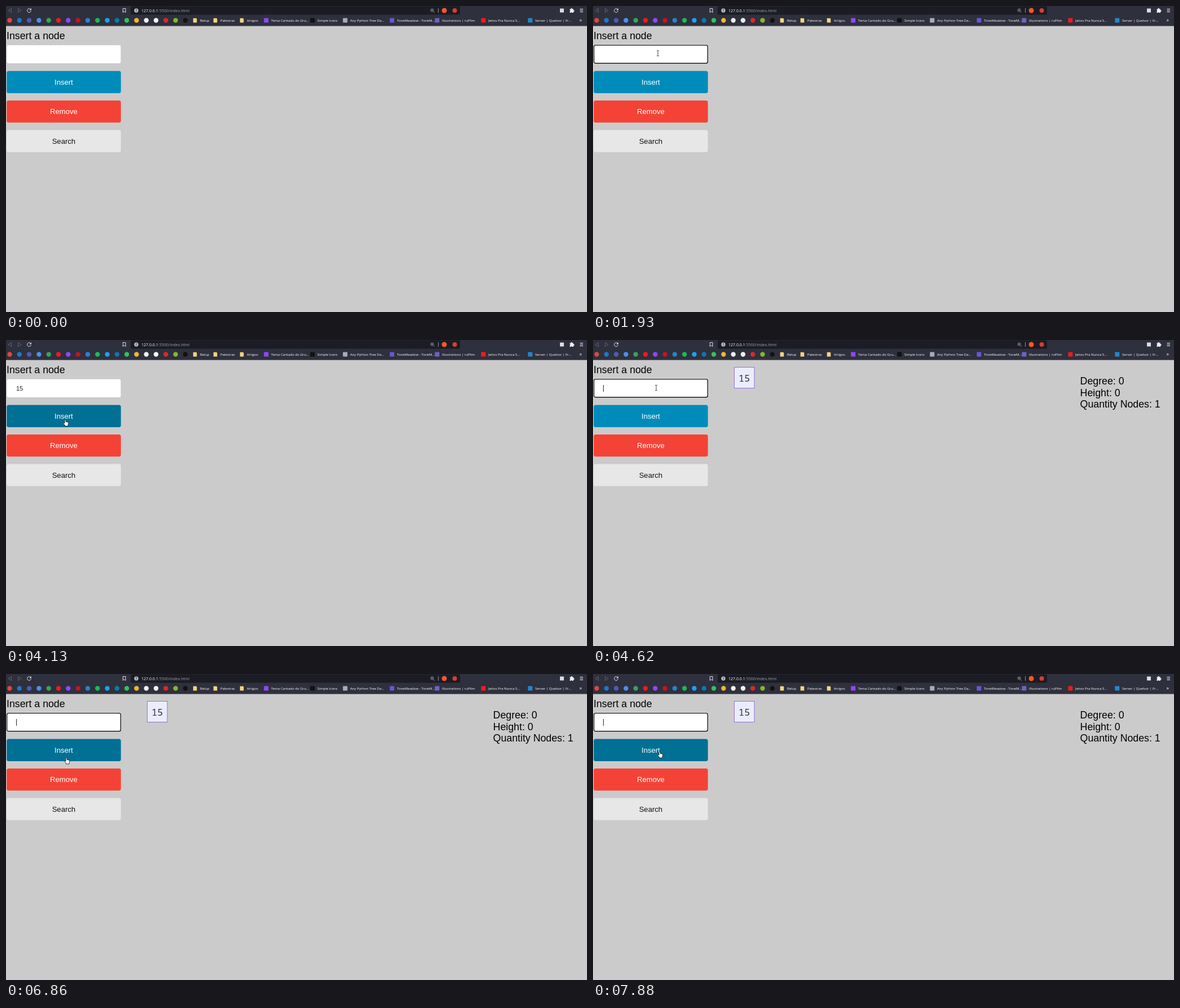
Recreate the animation shown at these times as an HTML page. Size 1030x544 px, loop 8000 ms.

```html
<!DOCTYPE html>
<html lang="en">
<head>
<meta charset="utf-8">
<title>Insert a node</title>
<style>
  html, body { margin: 0; width: 100%; height: 100%; overflow: hidden; background: #cbcbcb; }
  svg { display: block; width: 1030px; height: 544px; }
  text { white-space: pre; }
  .page { font-family: "Liberation Sans", Arial, sans-serif; font-size: 17.75px; }
  .label { font-size: 13.1px; text-anchor: middle; }
  .chrome { font-family: "Open Sans", "Noto Sans", sans-serif; font-size: 6.1px; fill: #fff; }
  .node { font: 17px "Noto Sans Mono", "DejaVu Sans Mono", monospace; text-anchor: middle; fill: #333; }
  .line { fill: none; stroke: #e4e4ea; }
  .thin { stroke: #a5a6ae; stroke-width: .8; }
</style>
</head>
<body>
<svg viewBox="0 0 1030 544">
  <rect width="1030" height="544" fill="#cbcbcb"/>

  <g id="browser">
    <rect width="1030" height="35.6" fill="#2f303d"/>
    <rect x="221" y=".5" width="584" height="15" rx="2" fill="#1b1c24"/>
    <path class="line" style="stroke:#6b6c78;stroke-width:.8" d="M9.5 4.5V11.5L4 8ZM21.5 4.5V11.5L27 8Z"/>
    <path class="line" d="M43.8 6A3.4 3.4 0 1 0 44.4 8.8"/>
    <path d="M44.8 4V7.4H41.4Z" fill="#e4e4ea"/>
    <path class="line" d="M207.3 4.5H212V11.5L209.6 9.5L207.3 11.5Z"/>
    <circle cx="231" cy="8" r="3.7" fill="#b9bac2"/>
    <path d="M231 5.5V8.5M231 9.5V10.5" stroke="#1b1c24"/>
    <text class="chrome" x="240" y="10.6" style="font-size:7.05px">127.0.0.1<tspan fill="#a0a1aa">:5500/index.html</tspan></text>
    <path class="line thin" d="M757.5 9.5L760 12M754.2 7.5H756.8M755.5 6.2V8.8"/>
    <circle class="line thin" cx="755.5" cy="7.5" r="2.6"/>
    <path d="M766.5 4V12" stroke="#92939c"/>
    <circle cx="777" cy="8" r="4.5" fill="#f4582a"/>
    <circle cx="795.5" cy="8" r="4" fill="#dc3c31"/>
    <rect x="982" y="4.5" width="7" height="7" fill="#dcdce2"/>
    <path d="M999.5 5.5H1001.5A1.3 1.3 0 1 1 1004 5.5H1006V7.5A1.3 1.3 0 1 1 1006 10V12H1003.8A1.2 1.2 0 0 0 1001.5 12H999.5V9.7A1.2 1.2 0 0 0 999.5 7.5Z" fill="#eeeef2"/>
    <path class="line" d="M1017.5 5.5H1023M1017.5 8H1023M1017.5 10.5H1023"/>
    <text class="chrome" x="1016.5" y="28" style="font-size:9px">»</text>
  </g>

  <g class="page">
    <text x="1" y="58.8">Insert a node</text>
    <rect x="1.4" y="69.4" width="202.2" height="32.6" rx="3" fill="#fff" stroke="#d4d4d4" stroke-width=".6"/>
    <g id="ring" fill="none">
      <rect x=".7" y="68.7" width="203.6" height="34" rx="3.5" stroke="#fff" stroke-width=".6"/>
      <rect x="1.6" y="69.6" width="201.8" height="32.2" rx="2.8" stroke="#101010" stroke-width="1.4"/>
    </g>
    <text id="value" x="18" y="89.8" style="font-size:11px" fill="#222"></text>
    <rect id="caret" y="80" width="1" height="12" fill="#222"/>
    <g id="buttons"></g>
    <g id="result">
      <rect x="250.5" y="48.5" width="35.5" height="37" fill="#ececff" stroke="#9370db"/>
      <text class="node" x="268.3" y="73.8">15</text>
      <text x="863.6" y="79">Degree: 0</text>
      <text x="863.6" y="99.5">Height: 0</text>
      <text x="863.6" y="120">Quantity Nodes: 1</text>
    </g>
  </g>

  <path id="arrow" d="M0 0V9.2L2.2 7.2L3.6 10.3L5 9.7L3.6 6.7H6.4Z" fill="#fff" stroke="#222" stroke-width=".7"/>
  <path id="beam" d="M-2 -4.8H-.5L0 -4.3L.5 -4.8H2M0 -4.3V4.3M-2 4.8H-.5L0 4.3L.5 4.8H2" fill="none" stroke="#333" stroke-width=".9"/>
  <path id="hand" d="M-1 .8Q0 -.6 1 .8V4.2L5 5.2Q6 5.6 5.8 7L5 10V12H-.6V10.6L-3.3 7.3Q-3.4 5.9 -2 6.3L-1 7.2Z" fill="#fff" stroke="#111" stroke-width=".8" stroke-linejoin="round"/>
</svg>

<script>
const LOOP = 8000;
const $ = id => document.getElementById(id);

function add(parent, tag, attrs, content) {
  const el = document.createElementNS('http://www.w3.org/2000/svg', tag);
  for (const name in attrs) el.setAttribute(name, attrs[name]);
  if (content) el.textContent = content;
  parent.appendChild(el);
  return el;
}

// Bookmarks bar: evenly spaced icons, then titled entries
const bar = $('browser');
const icon = (x, fill) => add(bar, 'rect', { x: x - 4, y: 21.5, width: 8, height: 8, rx: 1, fill });
const folder = x => add(bar, 'path', { d: `M${x - 3.2} 21.7h6v1h.6v6.8h-6.6Z`, fill: '#f3d67c' });

const iconColors = ('#e2453b #1979c9 #5059b8 #4c8ff0 #36a35c #ee1c1c #9146ff #c8131c #2a80cf #1db954 ' +
  '#1da1f2 #0a78b5 #2fc35c #f0b92d #f0f0f2 #f3f3f5 #d9292d #7fba28 #15120e').split(' ');
iconColors.forEach((fill, i) =>
  add(bar, 'circle', { cx: 6.5 + i * 17.3, cy: 25.5, r: 4.2, fill }));

const bookmarks = [
  [344, 'Belup'], [380, 'Palestras'], [427, 'Artigos'],
  [470, 'Tema Cantado do Gru...', '#9146ff'],
  [552, 'Simple Icons', '#111'],
  [610, 'Any Python Tree Da...', '#a9adb3'],
  [693, 'ToneMeadow - ToneM...', '#6a55d6'],
  [773, 'Illustrations | ruPlim', '#6c63c8'],
  [855, 'Jeitos Pra Nunca S...', '#ee1c1c'],
  [938, 'Server | Quelvor | Fr...', '#2188cc']
];
for (const [x, title, fill] of bookmarks) {
  if (fill) icon(x - 8.7, fill); else folder(x - 9);
  add(bar, 'text', { class: 'chrome', x, y: 27.8 }, title);
}

// Buttons
const BUTTON_HEIGHT = 39.3;
const buttons = [
  { label: 'Insert', ink: '#fff', base: [0, 140, 186], hover: [0, 112, 149] },
  { label: 'Remove', ink: '#fff', base: [244, 67, 54], hover: [207, 42, 14] },
  { label: 'Search', ink: '#111', base: [231, 231, 231], hover: [185, 185, 185] }
];
buttons.forEach((b, i) => {
  b.y = 115.6 + i * 52.4;
  b.rect = add($('buttons'), 'rect', { x: 1.2, y: b.y, width: 202.5, height: BUTTON_HEIGHT, rx: 3.5 });
  add($('buttons'), 'text', { class: 'label', x: 102.4, y: b.y + 24.4, fill: b.ink }, b.label);
});

// Pointer gestures; it rests between them
const entry = { time: 120, x: 975, y: 535 };
const moves = [
  { from: 120, to: 390, x: 315, y: 286 },
  { from: 590, to: 800, x: 158, y: 133 },
  { from: 1000, to: 1200, x: 115, y: 84 },
  { from: 3340, to: 4060, x: 105, y: 141 },
  { from: 4140, to: 4410, x: 112, y: 85 },
  { from: 5320, to: 5640, x: 844, y: 160 },
  { from: 5640, to: 5830, x: 966, y: 95 },
  { from: 5830, to: 6120, x: 920, y: 140 },
  { from: 6140, to: 6400, x: 570, y: 205 },
  { from: 6400, to: 6680, x: 107, y: 148 },
  { from: 6860, to: 7000, x: 127, y: 183 },
  { from: 7610, to: 7880, x: 118, y: 137 }
];
const clamp = v => Math.min(1, Math.max(0, v));
const ease = k => k * k * (3 - 2 * k);

function pointer(t) {
  if (t < entry.time) return null;
  let { x, y } = entry;
  for (const m of moves) {
    const k = ease(clamp((t - m.from) / (m.to - m.from)));
    x += (m.x - x) * k;
    y += (m.y - y) * k;
  }
  return { x, y };
}

const inside = (p, y, height) => p && p.x > 1 && p.x < 204 && p.y > y && p.y < y + height;
const over = (p, b) => inside(p, b.y, BUTTON_HEIGHT);

// Short colour fade: share of the last 90 ms spent over the button
function hoverAmount(t, b) {
  let hits = 0;
  for (let i = 0; i < 6; i++) if (over(pointer(t - i * 15), b)) hits++;
  return hits / 6;
}

// Moments that change the field
const CLICK = 1410, KEY_ONE = 2140, KEY_FIVE = 2400, BLUR = 4060, SUBMIT = 4200, REFOCUS = 4620;
const BLINK = 520;

function caretOn(t) {
  const last = [REFOCUS, KEY_FIVE, KEY_ONE, CLICK].find(time => t >= time);
  return Math.floor((t - last) / BLINK) % 2 === 0;
}

const show = (id, on) => $(id).setAttribute('visibility', on ? 'visible' : 'hidden');

function render(t) {
  const p = pointer(t);
  for (const b of buttons) {
    const k = hoverAmount(t, b);
    b.rect.setAttribute('fill', `rgb(${b.base.map((c, i) => Math.round(c + (b.hover[i] - c) * k))})`);
  }

  const focused = (t >= CLICK && t < BLUR) || t >= REFOCUS;
  const value = t < KEY_ONE || t >= SUBMIT ? '' : t < KEY_FIVE ? '1' : '15';
  $('value').textContent = value;
  $('caret').setAttribute('x', 18 + value.length * 6);
  show('ring', focused);
  show('caret', focused && caretOn(t));
  show('result', t >= SUBMIT);

  const shape = inside(p, 69, 34) ? 'beam' : buttons.some(b => over(p, b)) ? 'hand' : 'arrow';
  for (const id of ['arrow', 'beam', 'hand']) show(id, p && id === shape);
  if (p) $(shape).setAttribute('transform', `translate(${p.x} ${p.y})`);
}

const start = performance.now();
function tick() {
  render((performance.now() - start) % LOOP);
  requestAnimationFrame(tick);
}
tick();
</script>
</body>
</html>
```
